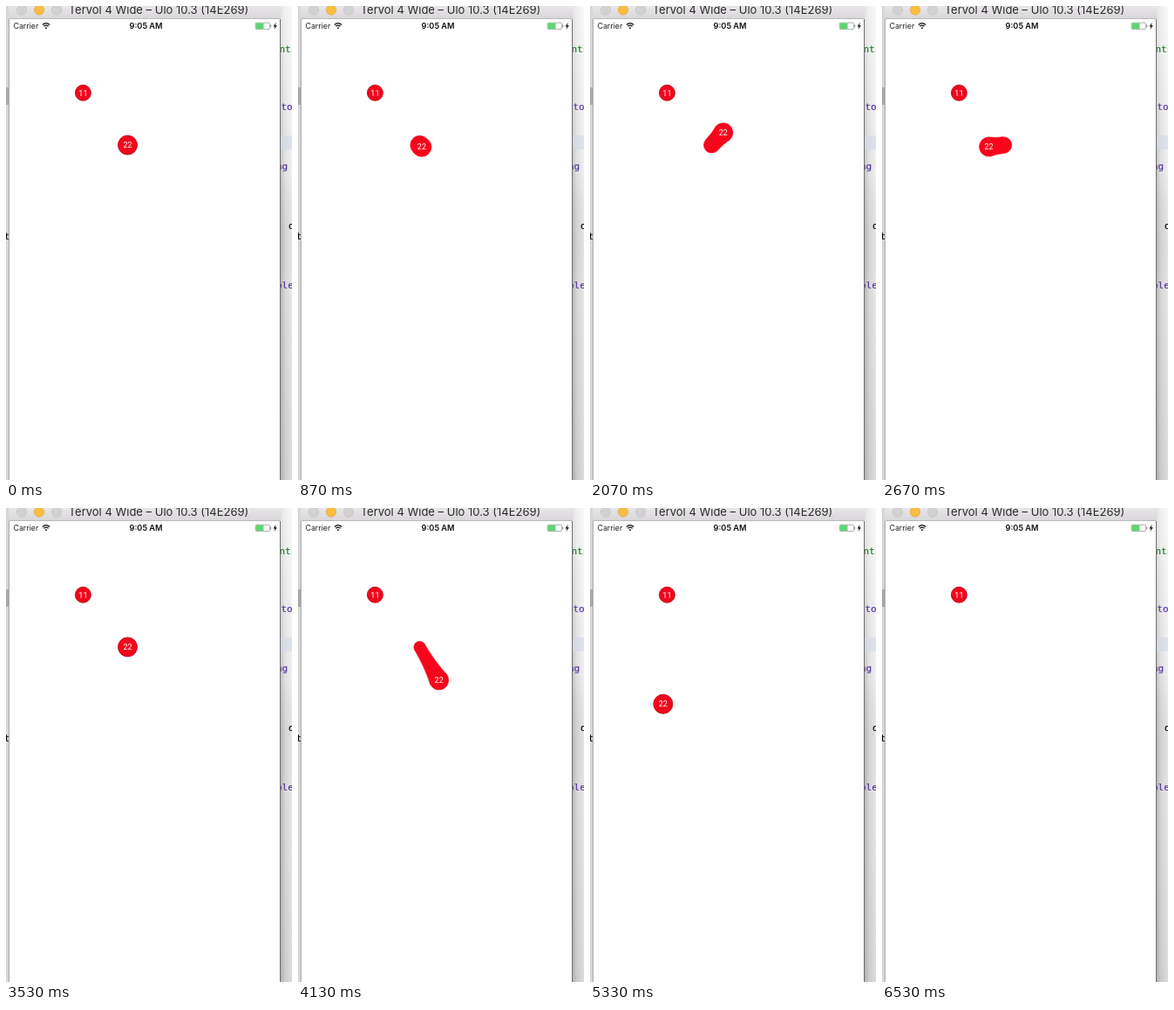
Animation, 328 px wide and 542 px high, one loop 6590 ms. Source, as an HTML page:

```html
<!DOCTYPE html>
<html lang="en">
<head>
<meta charset="utf-8">
<title>Sticky badges</title>
<style>
html, body { margin: 0; width: 100%; height: 100%; overflow: hidden; background: #fff; }
svg { display: block; width: 328px; height: 542px; font-family: Inter, Roboto, sans-serif; }
.code { font: 11px "DejaVu Sans Mono", monospace; fill: #5a35a0; stroke: #5a35a0; stroke-width: .2; }
.green { fill: #1a7f1f; stroke: #1a7f1f; }
.black { fill: #000; stroke: #000; }
.badge { fill: #fff; font: 9px Roboto, Inter, sans-serif; text-anchor: middle; }
.dot { fill: #f1061b; stroke: #c20a1b; stroke-width: .9; }
.tied .dot { fill: #f8051b; stroke: #f8051b; stroke-width: .6; }
</style>
</head>
<body>
<svg viewBox="0 0 328 542">
  <defs>
    <linearGradient id="shade">
      <stop offset="0" stop-color="#bcbcbc"/>
      <stop offset=".35" stop-color="#d9d9da"/>
      <stop offset="1" stop-color="#ededee"/>
    </linearGradient>
    <linearGradient id="dim" x2="0" y2="1">
      <stop offset="0" stop-color="#fff" stop-opacity=".6"/>
      <stop offset=".35" stop-color="#fff" stop-opacity=".15"/>
      <stop offset=".6" stop-color="#000" stop-opacity=".02"/>
      <stop offset="1" stop-color="#000" stop-opacity=".07"/>
    </linearGradient>
    <linearGradient id="bar" x2="0" y2="1">
      <stop offset="0" stop-color="#e8e6e8"/>
      <stop offset="1" stop-color="#d8d6d8"/>
    </linearGradient>
    <clipPath id="side"><path d="M315 0h13v542h-13z"/></clipPath>
  </defs>

  <!-- editor behind the window -->
  <rect width="4" height="542" fill="#d6d6d6"/>
  <rect y="93" width="4" height="20" fill="#a9a9a9"/>
  <text class="code black" x="-2.2" y="267">t</text>
  <g clip-path="url(#side)">
    <rect x="315" width="13" height="542" fill="url(#shade)"/>
    <rect x="315" width="13" height="542" fill="url(#dim)"/>
    <rect x="315" y="148" width="13" height="16" fill="#d3dae8" opacity=".65"/>
    <g class="code">
      <text class="green" x="313.5" y="53">nts</text>
      <text x="315.5" y="119">to</text>
      <text x="310" y="187">ng</text>
      <text class="black" x="310.7" y="255">: d</text>
      <text x="310" y="323">ble</text>
    </g>
  </g>

  <!-- window -->
  <path d="M3 0h312v15H3z" fill="url(#bar)"/>
  <path d="M4 14.5h310" stroke="#bbb9bb"/>
  <g fill="#d3d2d3" stroke="#c2c1c2" stroke-width=".7">
    <circle cx="18" cy="4.5" r="5.6"/>
    <circle cx="38" cy="4.5" r="5.6" fill="#fbbd3f" stroke="#e2a236"/>
    <circle cx="58" cy="4.5" r="5.6"/>
  </g>
  <text x="175" y="9" font-size="13" text-anchor="middle" fill="#2b2b2b">Tervol 4 Wide – Ulo 10.3 (14E269)</text>
  <rect x="4" y="15" width="310" height="527" fill="#fff"/>
  <path d="M314.5 15v527" stroke="#707070"/>
  <path d="M3.5 15v527" stroke="#aaa"/>

  <!-- status bar -->
  <text x="8.5" y="26" font-size="8.8" fill="#222">Carrier</text>
  <g fill="none" stroke="#111" stroke-width="1.3">
    <path d="M41.8 21.4q4.2-3.6 8.4 0M43.4 23.3q2.6-2.2 5.2 0"/>
    <path d="M46 26.4l-1.4-1.6q1.4-1 2.8 0z" fill="#111" stroke="none"/>
  </g>
  <text x="160.5" y="26" font-size="9.2" font-weight="600" text-anchor="middle" fill="#111">9:05 AM</text>
  <rect x="286.2" y="19.2" width="16.4" height="7.4" rx="1.4" fill="#fff" stroke="#888" stroke-width=".7"/>
  <rect x="286.5" y="19.5" width="9" height="6.8" rx="1" fill="#5fd576"/>
  <path d="M303.7 21.5v2.8" stroke="#888"/>
  <path d="M309.8 18.8l-3.3 4.6h2l-1 3.6 3.4-4.8h-2z" fill="#111"/>

  <!-- badges -->
  <circle class="dot" cx="88.4" cy="99.3" r="9"/>
  <text class="badge" x="88.4" y="102.5">11</text>
  <g id="sticky">
    <path id="neck" fill="#f8051b" stroke="#d8081b" stroke-width=".5"/>
    <circle id="tail" class="dot" cx="139.5" cy="159"/>
    <g id="ball">
      <circle class="dot" r="11"/>
      <text class="badge" y="3.2">22</text>
    </g>
  </g>
</svg>
<script>
const LOOP = 6590, STEP = LOOP / 99;
const HOME = { x: 139.5, y: 159 }, R = 11, SNAP = 50;
const RELEASE = 3050, SETTLED = 3480, GONE = 5900;

// time, offset from home
const firstDrag = [[750, 0, 0], [1050, 8, 8], [1400, 18, 22], [1750, 24, 4],
  [2070, 13, -14.5], [2400, -10, -18], [2720, -17, 6], [RELEASE, -8, 20]];
const secondDrag = [[3660, 0, 0], [4100, 21, 36], [4600, 40.5, 69],
  [4960, -4, 82], [5330, -56, 65], [5600, -60, 61], [GONE, -60, 61]];

const $ = id => document.getElementById(id);
const sticky = $('sticky'), neck = $('neck'), tail = $('tail'), ball = $('ball');

function spline(a, b, c, d, u) {
  return b + u / 2 * (c - a + u * (2 * a - 5 * b + 4 * c - d + u * (3 * (b - c) + d - a)));
}

function along(path, t) {
  const last = path.length - 1;
  if (t <= path[0][0]) return [0, 0];
  if (t >= path[last][0]) return path[last].slice(1);
  const i = path.findIndex(p => p[0] > t) - 1;
  const at = k => path[Math.max(0, Math.min(last, k))];
  const u = (t - at(i)[0]) / (at(i + 1)[0] - at(i)[0]);
  return [1, 2].map(k => spline(at(i - 1)[k], at(i)[k], at(i + 1)[k], at(i + 2)[k], u));
}

function springBack(t) {
  const u = (t - RELEASE) / (SETTLED - RELEASE);
  if (u >= 1) return [0, 0];
  const k = Math.exp(-5 * u) * Math.cos(3 * Math.PI * u);
  return along(firstDrag, RELEASE).map(v => v * k);
}

function offset(t) {
  if (t < RELEASE) return along(firstDrag, t);
  return t < secondDrag[0][0] ? springBack(t) : along(secondDrag, t);
}

function neckPath(dx, dy, d, r) {
  const nx = -dy / d, ny = dx / d;
  const pt = (f, w) => `${HOME.x + dx * f + nx * w} ${HOME.y + dy * f + ny * w}`;
  return `M${pt(0, r)}Q${pt(.5, r)} ${pt(1, R)}L${pt(1, -R)}Q${pt(.5, -r)} ${pt(0, -r)}Z`;
}

function draw(t) {
  const [dx, dy] = offset(t), d = Math.hypot(dx, dy);
  const free = t >= RELEASE && t < secondDrag[0][0];
  const tied = d > .5 && d < SNAP && !free;
  const r = R - d * .1;
  sticky.classList.toggle('tied', tied);
  sticky.style.display = t < GONE ? '' : 'none';
  neck.setAttribute('d', tied ? neckPath(dx, dy, d, r) : '');
  tail.setAttribute('r', tied ? r : 0);
  ball.setAttribute('transform', `translate(${HOME.x + dx} ${HOME.y + dy})`);
}

const start = performance.now();
function tick() {
  const t = (performance.now() - start) % LOOP;
  draw(Math.floor(t / STEP) * STEP);
  requestAnimationFrame(tick);
}
tick();
</script>
</body>
</html>
```
